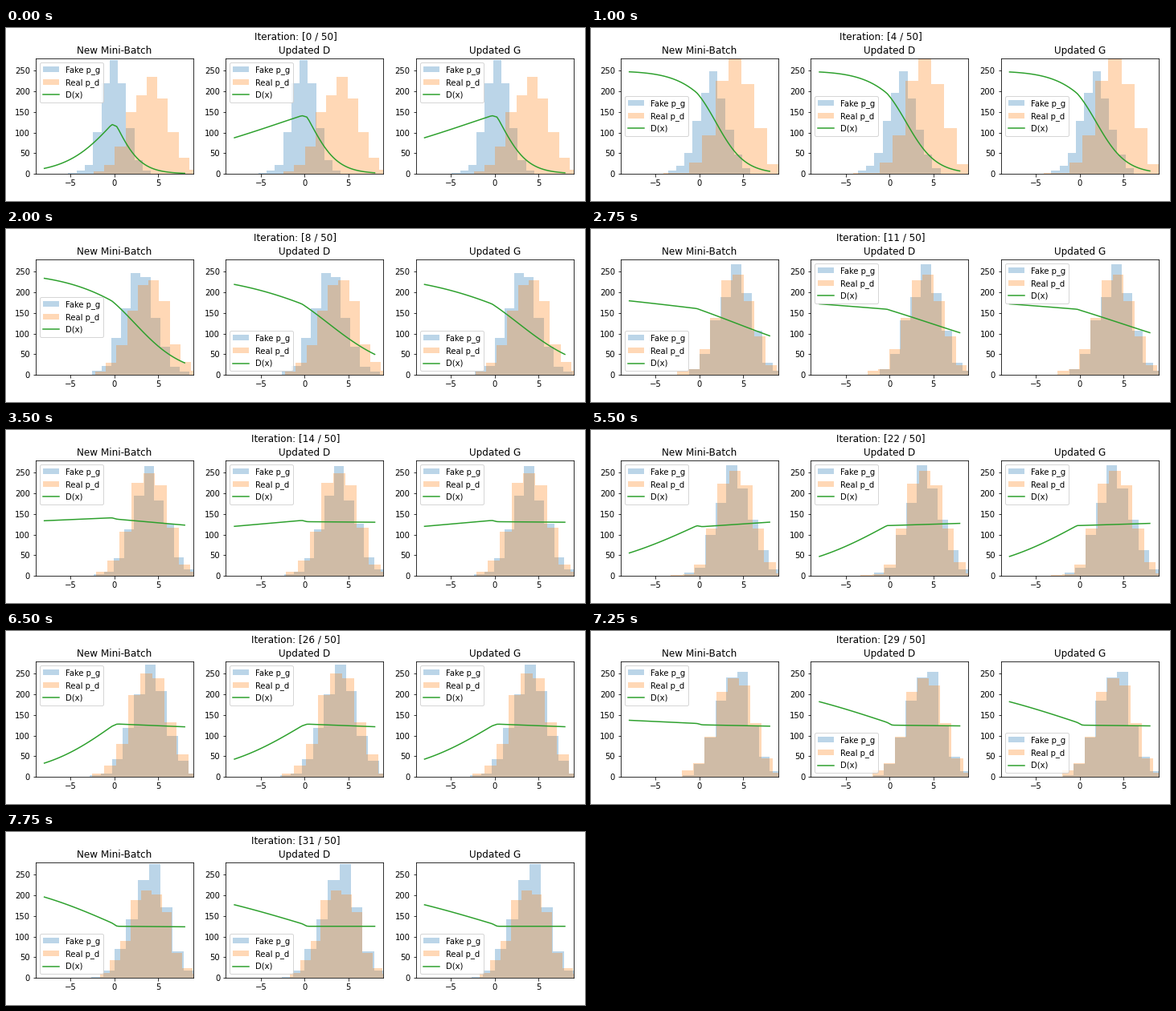
Recreate the animation shown at these times as a matplotlib script. Size 720 px wide and 216 px high, loop 8 s.

```python
import numpy as np
import matplotlib.pyplot as plt
from matplotlib.animation import FuncAnimation

W, H, DPI = 720, 216, 72
STEPS, INTERVAL, TOTAL = 32, 250, 50
BATCH, BINS, SCALE = 1000, 10, 250
REAL_MEAN, REAL_STD = 4, 2
LEARNED = 11  # iterations until the fake mean reaches the real one
TITLES = ["New Mini-Batch", "Updated D", "Updated G"]

# The discriminator's logit is piecewise linear with corners at CORNERS.
# Key shapes by number of updates, eased in between.
CORNERS = [-8, -0.3, 0.3, 8]
SHAPES = {
    0: [-2.9, -0.08, -0.17, -5.4],
    1: [-0.62, 0.26, 0.2, -4.65],
    4: [4.6, 1.3, 0.95, -3.7],
    12: [0.79, 0.56, 0.49, -0.37],
    15: [-0.08, 0.15, 0.1, 0.08],
    20: [-1.05, -0.06, -0.14, 0.13],
    26: [-1.88, -0.04, 0.05, -0.06],
    31: [1.29, 0.13, 0, -0.02],
    32: [0.89, 0.1, 0, 0],
}

x = np.linspace(-8, 8, 65)


def curve(n):
    """Discriminator output after n updates."""
    keys = list(SHAPES)
    i = min(np.searchsorted(keys, n, side="right"), len(keys) - 1)
    a, b = keys[i - 1], keys[i]
    ease = (1 - np.cos(np.pi * (n - a) / (b - a))) / 2
    logits = (1 - ease) * np.array(SHAPES[a]) + ease * np.array(SHAPES[b])
    return SCALE / (1 + np.exp(-np.interp(x, CORNERS, logits)))


def fake_mean(n):
    return REAL_MEAN * min(n / LEARNED, 1)


def fake_std(n):
    return min(1.35 + 0.05 * n, 1.85)


def legend_spot(y):
    """Corner of the left side that the curve leaves free."""
    left = y[x < -1]
    if left.max() < 174:
        return "upper left"
    return "center left" if left.min() > 188 else "lower left"


def draw(n):
    heading.set_text(f"Iteration: [{n} / {TOTAL}]")
    rng = np.random.default_rng(n)
    fake = rng.normal(fake_mean(n), fake_std(n), BATCH)
    real = rng.normal(REAL_MEAN, REAL_STD, BATCH)
    step = fake_mean(n + 1) - fake_mean(n)
    for i, ax in enumerate(axes):
        y = curve(n + (i > 0))
        shift = step if i == 2 else 0
        ax.clear()
        ax.hist(fake + shift, BINS, color="C0", alpha=0.3, label="Fake p_g")
        ax.hist(real, BINS, color="C1", alpha=0.3, label="Real p_d")
        ax.plot(x, y, "C2", linewidth=1.5, label="D(x)")
        ax.set(xlim=(-9, 9), ylim=(0, 280), xticks=[-5, 0, 5],
               yticks=range(0, 251, 50))
        ax.set_title(TITLES[i], fontsize=12)
        ax.legend(loc=legend_spot(y), fontsize=10)
    return axes


plt.rcParams.update({"font.family": "DejaVu Sans", "font.size": 10})
fig = plt.figure(figsize=(W / DPI, H / DPI), dpi=DPI)
heading = fig.suptitle("", fontsize=12)
axes = [fig.add_axes([(36.75 + 236.4 * i) / W, 34 / H, 196.3 / W, 144 / H])
        for i in range(3)]

anim = FuncAnimation(fig, draw, frames=STEPS, init_func=lambda: axes,
                     interval=INTERVAL, repeat=True, repeat_delay=0)
plt.show()
```
